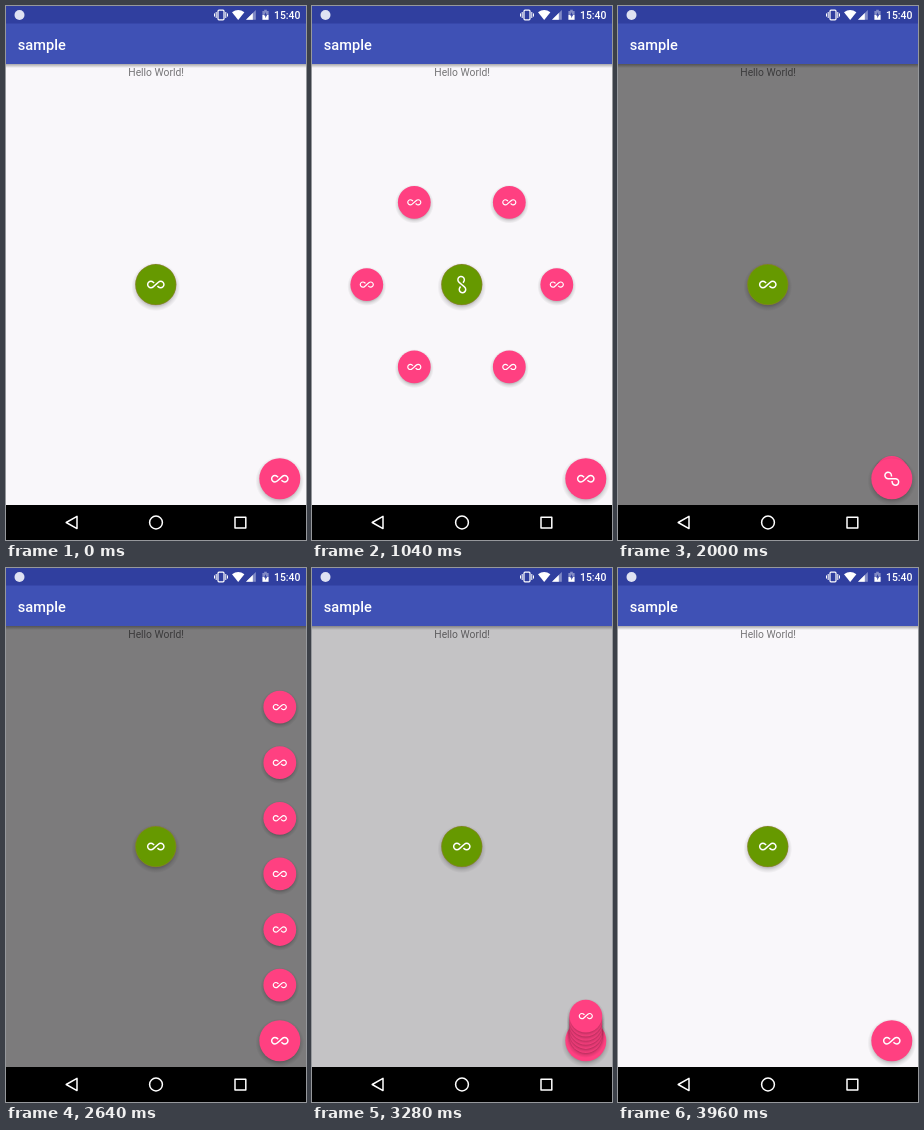
Recreate the animation shown at these times as an HTML page. Size 300 by 534 pixels, loop 4 s.

```html
<!DOCTYPE html>
<html lang="en">
<head>
<meta charset="utf-8">
<title>Floating menus</title>
<style>
  html, body { margin: 0; width: 100%; height: 100%; overflow: hidden; background: #000; }
  svg { display: block; width: 100vw; height: 100vh; }
  text { font-family: Roboto, "Noto Sans", sans-serif; }
</style>
</head>
<body>
<svg id="stage" viewBox="0 0 300 534">
  <defs>
    <radialGradient id="shade">
      <stop offset=".72" stop-color="#000" stop-opacity=".3"/>
      <stop offset=".86" stop-color="#000" stop-opacity=".11"/>
      <stop offset="1" stop-color="#000" stop-opacity="0"/>
    </radialGradient>
    <linearGradient id="drop" x2="0" y2="1">
      <stop offset="0" stop-color="#000" stop-opacity=".32"/>
      <stop offset="1" stop-color="#000" stop-opacity="0"/>
    </linearGradient>
    <path id="loop" fill="#fff" transform="translate(-12 -12)" d="M18.6 6.62c-1.44 0-2.8.56-3.77 1.53L12 10.66 10.48 12h.01L7.8 14.39c-.64.64-1.49.99-2.4.99-1.87 0-3.39-1.51-3.39-3.38S3.53 8.62 5.4 8.62c.91 0 1.76.35 2.44 1.03l1.13 1 1.51-1.34L9.22 8.2C8.2 7.18 6.84 6.62 5.4 6.62 2.42 6.62 0 9.04 0 12s2.42 5.38 5.4 5.38c1.44 0 2.8-.56 3.77-1.53l2.83-2.5.01.01L13.52 12h-.01l2.69-2.39c.64-.64 1.49-.99 2.4-.99 1.87 0 3.39 1.51 3.39 3.38s-1.52 3.38-3.39 3.38c-.9 0-1.76-.35-2.44-1.03l-1.14-1.01-1.51 1.34 1.27 1.12c1.02 1.01 2.37 1.57 3.82 1.57 2.98 0 5.4-2.41 5.4-5.38s-2.42-5.37-5.4-5.37z"/>
  </defs>

  <rect y="58" width="300" height="441" fill="#f9f7fa"/>
  <text x="122.3" y="69.5" font-size="10.3" fill="#757476">Hello World!</text>
  <rect id="dim" y="58" width="300" height="441" opacity="0"/>
  <rect y="58" width="300" height="4" fill="url(#drop)"/>

  <g id="menus"></g>

  <rect width="300" height="18" fill="#303f9f"/>
  <rect y="17.5" width="300" height="40.5" fill="#3f51b5"/>
  <text x="11.8" y="44" font-size="14.6" font-weight="500" fill="#fff">sample</text>

  <g fill="#fff">
    <circle cx="13.5" cy="9" r="5" fill="#dfe2f2"/>
    <rect x="212" y="4.2" width="6" height="9.6" rx="1" fill="none" stroke="#fff" stroke-width="1.2"/>
    <path d="M210.2 6v6M219.8 6v6M208.5 7.4v3.2M221.5 7.4v3.2" stroke="#fff"/>
    <path d="M226 6.2q6.2-4.6 12.4 0L232.2 14z"/>
    <path d="M240 13.8L249.8 4v9.8z" opacity=".4"/>
    <path d="M240 13.8L246.8 7v6.8z"/>
    <path d="M256.4 5h1.8V3.8h2.6V5h1.8v4h-6.2z" opacity=".4"/>
    <path d="M256.4 9h6.2v4.8h-6.2z"/>
    <path d="M260 6l-2 3.6h1.3v2.6l2-3.7H260z" fill="#303f9f"/>
    <text x="268" y="13" font-size="10.4" font-weight="500">15:40</text>
  </g>

  <rect y="499" width="300" height="35"/>
  <g fill="none" stroke="#fff" stroke-width="1.5" stroke-linejoin="round">
    <path d="M71 510.4v12.2L60.2 516.5z"/>
    <circle cx="150" cy="516.5" r="6.4"/>
    <rect x="229" y="511.2" width="10.8" height="10.8"/>
  </g>
</svg>
<script>
const NS = "http://www.w3.org/2000/svg";
const LOOP = 4000, STEP = 40, COUNT = 6;
const PINK = "#ff4081", GREEN = "#669900";

function add(parent, tag, attrs = {}) {
  const el = document.createElementNS(NS, tag);
  for (const k in attrs) el.setAttribute(k, attrs[k]);
  parent.append(el);
  return el;
}

function button(parent, color) {
  const g = add(parent, "g");
  add(g, "circle", { cy: 2.2, r: 24.4, fill: "url(#shade)" });
  add(g, "circle", { r: 20.5, fill: color });
  if (color === GREEN) {
    add(g, "circle", { r: 20.2, fill: "none", stroke: "#a86a50", "stroke-width": .6, opacity: .6 });
  }
  const icon = add(g, "g");
  add(icon, "use", { href: "#loop", transform: "scale(.74)" });
  return { g, icon };
}

const clamp = v => Math.max(0, Math.min(1, v));
const phase = (t, start, span) => clamp((t - start) / span);
const smooth = x => .5 - Math.cos(x * Math.PI) / 2;
const overshoot = x => (x - 1) ** 2 * (3 * (x - 1) + 2) + 1;

// Offsets of the small buttons once fully open.
const ring = i => [95.6 * Math.cos(i * Math.PI / 3), 95.6 * Math.sin(i * Math.PI / 3)];
const column = i => [0, -55.6 * (i + 1)];

function makeMenu(x, y, color, place, times) {
  const root = add(document.getElementById("menus"), "g", { transform: `translate(${x} ${y})` });
  const items = add(root, "g");
  const small = Array.from({ length: COUNT }, (_, i) => ({ ...button(items, PINK), to: place(i) }));
  const hub = button(root, color);
  return { root, items, small, hub, ...times };
}

const menus = [
  makeMenu(149.8, 278.6, GREEN, ring, { open: 60, turnBack: 945, close: 1030 }),
  makeMenu(273.8, 472.7, PINK, column, { open: 1965, turnBack: 3070, close: 3115 })
];
const dim = document.getElementById("dim");

function drawMenu(m, t) {
  const closing = t >= m.turnBack;
  const p = smooth(phase(t, m.open, 400)) - smooth(phase(t, m.close, 200));
  const turn = closing
    ? 1 - overshoot(phase(t, m.turnBack, 720))
    : overshoot(phase(t, m.open, 700));

  // The pressed hub covers the items on the way out, not on the way back.
  const top = closing ? m.items : m.hub.g;
  if (m.root.lastChild !== top) m.root.append(top);

  m.items.setAttribute("visibility", p > .0005 ? "visible" : "hidden");
  for (const s of m.small) {
    s.g.setAttribute("transform", `translate(${s.to[0] * p} ${s.to[1] * p}) scale(.8)`);
  }
  m.hub.icon.setAttribute("transform", `rotate(${180 * turn})`);
}

function draw(t) {
  for (const m of menus) drawMenu(m, t);
  const { open, close } = menus[1];
  dim.setAttribute("opacity", t > open ? .5 * (1 - smooth(phase(t, close, 300))) : 0);
}

const begin = performance.now();
function tick() {
  const t = (performance.now() - begin) % LOOP;
  draw(Math.floor(t / STEP) * STEP);
  requestAnimationFrame(tick);
}
draw(0);
requestAnimationFrame(tick);
</script>
</body>
</html>
```
